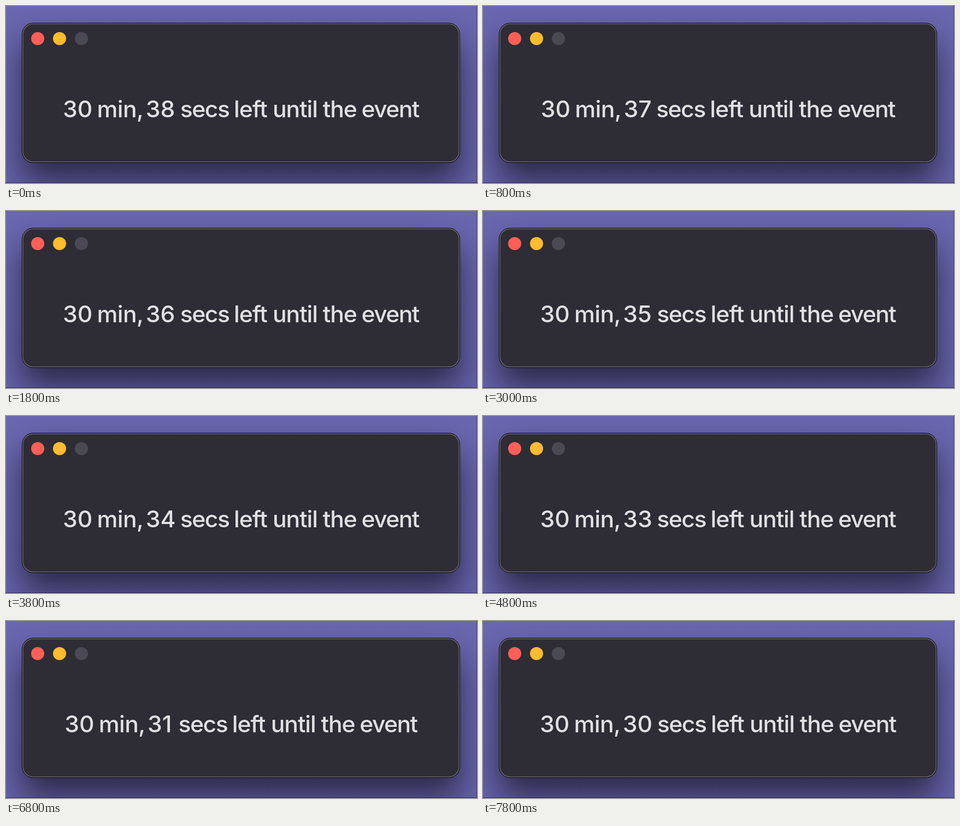
These frames come from a looping animation (862x326 px, 8000 ms). An HTML page:

```html
<!DOCTYPE html>
<html lang="en">
<head>
<meta charset="utf-8">
<title>Countdown</title>
<style>
  html, body { margin: 0; width: 100%; height: 100%; overflow: hidden; background: #6662aa; }
  svg { display: block; width: 100vw; height: 100vh; }
  text {
    font: 450 42.7px Inter, Roboto, sans-serif;
    font-optical-sizing: none;
    fill: #e1e0e2;
    white-space: pre;
  }
</style>
</head>
<body>
<svg viewBox="0 0 862 326">
  <defs>
    <linearGradient id="wall" x1="0" y1="0" x2="0" y2="1">
      <stop offset="0" stop-color="#6a66af"/>
      <stop offset="1" stop-color="#6662ab"/>
    </linearGradient>
    <filter id="blur" filterUnits="userSpaceOnUse" x="-100" y="-100" width="1062" height="620">
      <feGaussianBlur stdDeviation="29"/>
    </filter>
  </defs>
  <rect width="862" height="326" fill="url(#wall)"/>
  <rect x="29" y="65" width="802" height="258" rx="21" opacity=".57" filter="url(#blur)"/>
  <rect y="325" width="862" height="1" fill="#1c1a38" opacity=".65"/>
  <rect x="861" width="1" height="325" fill="#1c1a38" opacity=".4"/>
  <rect x="29" y="31" width="802" height="258" rx="21" fill="#050508"/>
  <rect x="30" y="32" width="800" height="256" rx="20" fill="#69686e"/>
  <rect x="31.5" y="33.5" width="797" height="253" rx="18.5" fill="#2e2c35"/>
  <circle cx="58" cy="60" r="12" fill="#ff5f57"/>
  <circle cx="98" cy="60" r="12" fill="#febc2e"/>
  <circle cx="138" cy="60" r="12" fill="#4b4a54"/>
  <text id="line" y="204.5"></text>
</svg>
<script>
  const LOOP = 8000, START = 38;
  // word, left edge, tracking in px
  const WORDS = [
    ["30", 104, 0], ["min,", 166.5, -0.6], ["38", 255.7, 0], ["secs", 318.8, -1.5],
    ["left", 416.9, -1], ["until", 488, -1.1], ["the", 579.8, -1.1], ["event", 650.5, -1.6]
  ];
  const SECS = 2;
  // half the width each last digit lacks, keeps the line centred
  const INSET = { 1: 3.25, 2: 0.5, 3: 0.5, 5: 0.5, 7: 1.75 };

  const line = document.getElementById("line");
  const spans = WORDS.map(([word, , tracking], i) => {
    const span = document.createElementNS("http://www.w3.org/2000/svg", "tspan");
    span.style.letterSpacing = tracking + "px";
    span.textContent = word + (i < WORDS.length - 1 ? " " : "");
    return line.appendChild(span);
  });

  let shown;
  function draw(t) {
    const secs = START - Math.floor((t + 200) / 1000);
    if (secs === shown) return;
    shown = secs;
    const inset = INSET[secs % 10] || 0;
    spans.forEach((span, i) => span.setAttribute("x", WORDS[i][1] + (i <= SECS ? inset : -inset)));
    spans[SECS].textContent = secs + " ";
  }

  const origin = performance.now();
  function tick() {
    draw((performance.now() - origin) % LOOP);
    requestAnimationFrame(tick);
  }
  tick();
</script>
</body>
</html>
```
